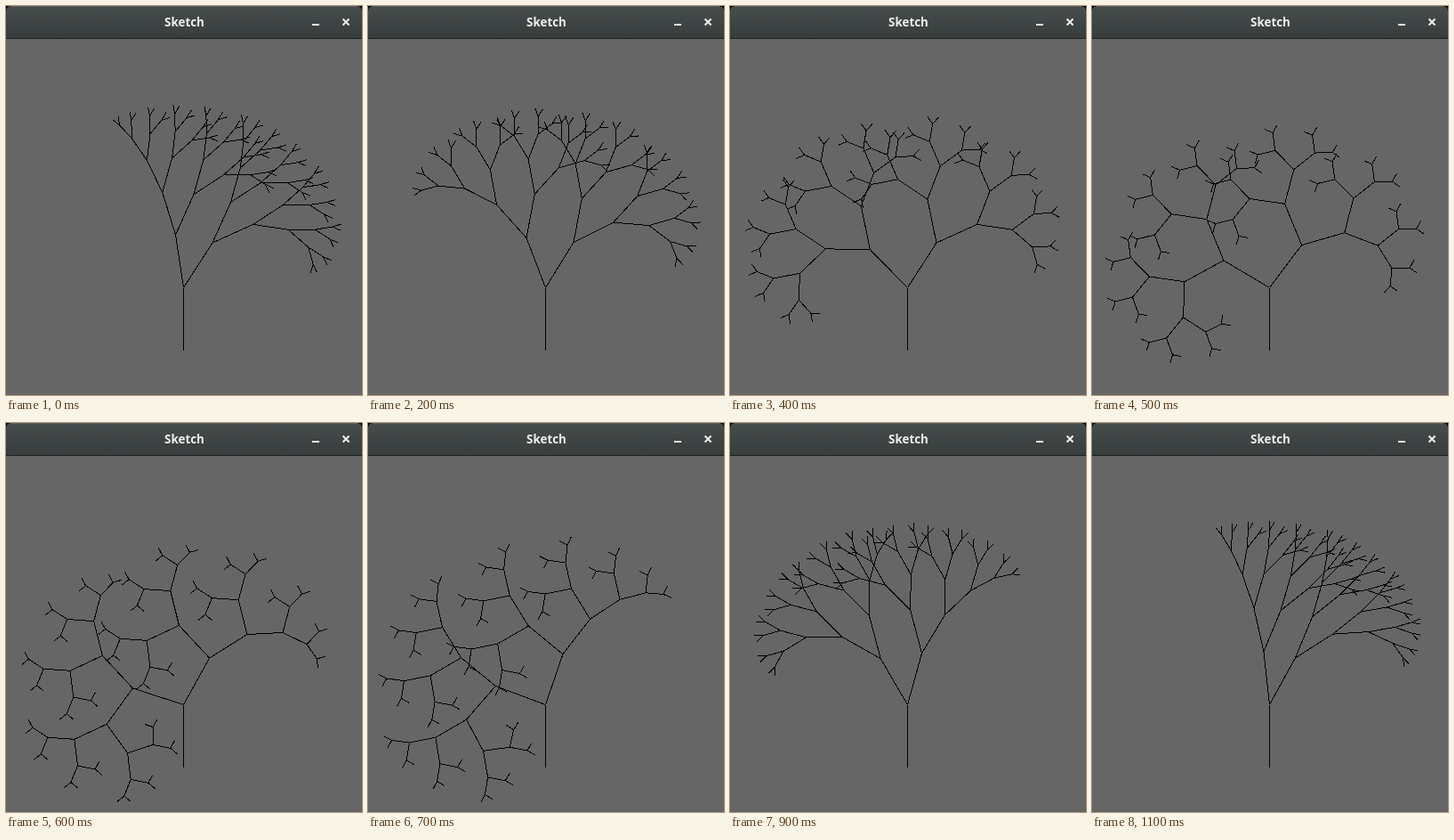
Animation, 400 px wide and 437 px high, one loop 1200 ms. Source, as an HTML page:

```html
<!DOCTYPE html>
<html lang="en">
<head>
<meta charset="utf-8">
<title>Sketch</title>
<style>
  html, body { margin: 0; width: 100%; height: 100%; overflow: hidden; background: #000; }
  svg { display: block; width: 400px; height: 437px; }
  .title { font: bold 13.4px "Open Sans", "Noto Sans", sans-serif; fill: #eee; text-anchor: middle; }
  #tree { fill: none; stroke: #000; stroke-width: 1; shape-rendering: crispEdges; }
</style>
</head>
<body>
<svg viewBox="0 0 400 437">
  <defs>
    <linearGradient id="bar" x1="0" y1="0" x2="0" y2="1">
      <stop offset="0" stop-color="#474d4c"/>
      <stop offset="1" stop-color="#363d3c"/>
    </linearGradient>
  </defs>
  <path d="M0 37V6Q0 0 6 0H394Q400 0 400 6V37Z" fill="url(#bar)"/>
  <path d="M5 .5H395" stroke="#5a6160"/>
  <rect y="36" width="400" height="1" fill="#1e2222"/>
  <text class="title" x="200.5" y="23">Sketch</text>
  <rect x="344" y="20" width="8" height="2" fill="#eee"/>
  <path d="M378.5 14.5L385.5 21.5M385.5 14.5L378.5 21.5" stroke="#eee" stroke-width="2"/>
  <rect y="37" width="400" height="400" fill="#666"/>
  <path id="tree"/>
</svg>
<script>
  const STEP = 100;
  // [left, right] branching angle in degrees at each step
  const poses = [
    [8.6, 32.8], [14, 32.4], [21, 31.7], [32, 31.9], [44.5, 32.8], [59.3, 37],
    [72, 29], [69.5, 18.9], [55, 12.2], [30.3, 15.5], [15, 22], [6.3, 28.8]
  ];
  const tree = document.getElementById("tree");

  function branch(x, y, angle, length, left, right) {
    if (length <= 0) return "";
    const rad = angle * Math.PI / 180;
    const tipX = x + length * Math.sin(rad);
    const tipY = y - length * Math.cos(rad);
    return `M${x.toFixed(2)} ${y.toFixed(2)}L${tipX.toFixed(2)} ${tipY.toFixed(2)}` +
      branch(tipX, tipY, angle - left, length - 10, left, right) +
      branch(tipX, tipY, angle + right, length - 10, left, right);
  }

  const start = performance.now();
  let shown = -1;

  function draw() {
    const step = Math.floor((performance.now() - start) / STEP) % poses.length;
    if (step !== shown) {
      shown = step;
      tree.setAttribute("d", branch(199.5, 386.5, 0, 70, ...poses[step]));
    }
    requestAnimationFrame(draw);
  }
  draw();
</script>
</body>
</html>
```
